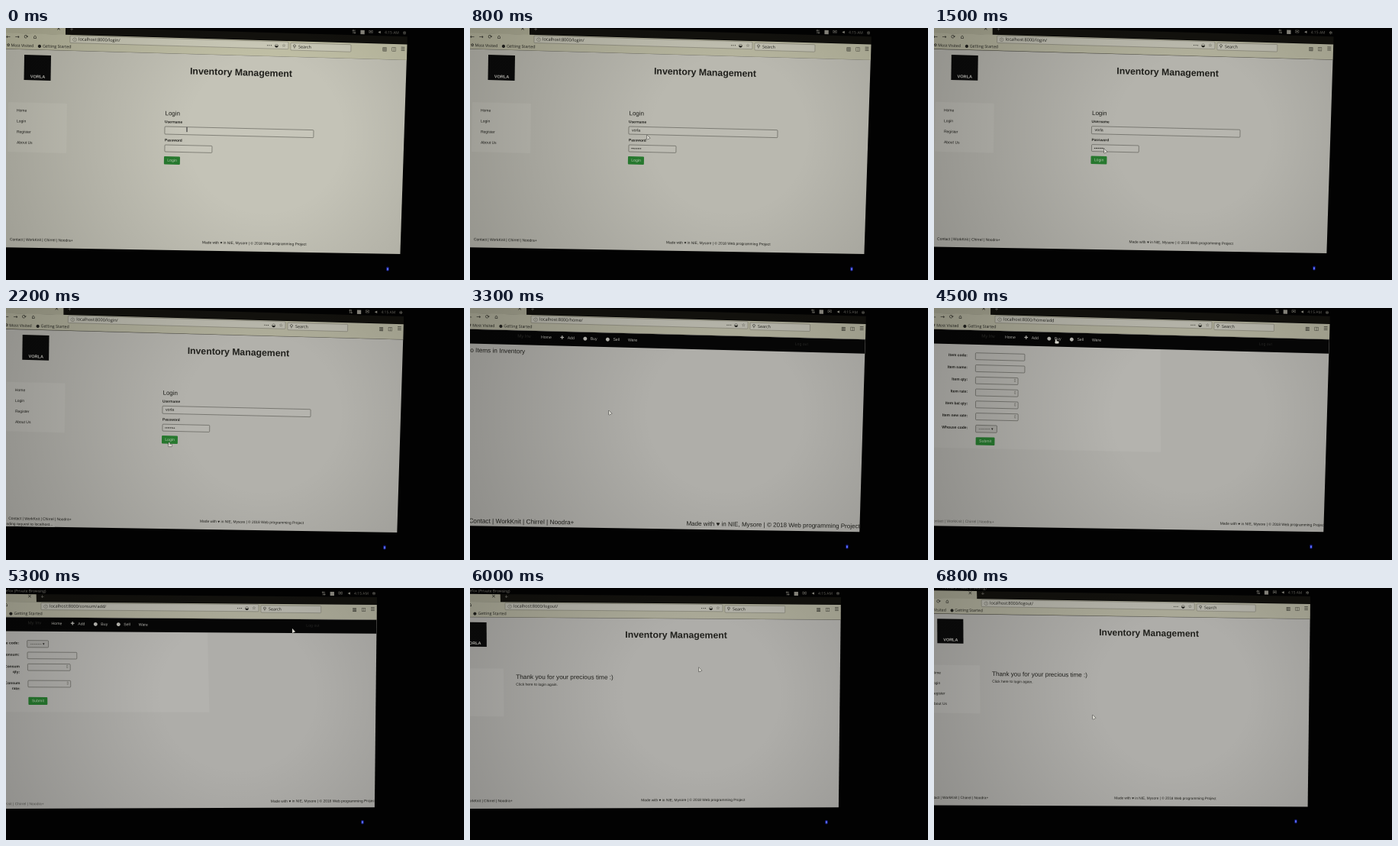
An HTML page with a canvas that plays this animation: 600x330 px, repeating every 6900 ms.

```html
<!DOCTYPE html>
<html lang="en">
<head>
<meta charset="utf-8">
<title>Inventory Management demo</title>
<style>
html, body { margin: 0; width: 100%; height: 100%; overflow: hidden; background: #020202; }
canvas { display: block; width: 600px; height: 330px; filter: blur(.25px); }
</style>
</head>
<body>
<canvas id="stage" width="600" height="330"></canvas>
<script>
const ctx = document.getElementById('stage').getContext('2d');
const LOOP = 6900, STEP = 100;
const SANS = '"Liberation Sans", Arial, sans-serif';
const UI = '"Open Sans", "Noto Sans", sans-serif';
const GLYPH = '"DejaVu Sans", sans-serif';
const INK = '#20201c', DIM = '#8a887f', GREEN = '#277a2f', RIM = 'rgba(60,60,54,.7)';

const clamp = p => Math.min(1, Math.max(0, p));
const ramp = (t, from, to) => clamp((t - from) / (to - from));
const smooth = p => p * p * (3 - 2 * p);

// Resting spots of the address, the search label and the monitor's LED.
const ANCHORS = [[95, 15], [383, 25], [500, 316]];

// Hand-held camera: when it moves, and how far each anchor travels.
const MOVES = [
  { from: 800, to: 2900, shift: [[-4, 0], [-6, -.5], [-6, -3]] },
  { from: 5000, to: 5300, shift: [[-34, 9], [-33, 3.5], [-27, -6]] },
  { from: 6300, to: 6700, shift: [[16, -4], [10, -2], [7, -1]] }
];

const POINTER = [
  [0, 237, 133], [800, 233, 142], [2200, 215, 178], [3300, 183, 136],
  [4500, 161, 43], [5300, 376, 55], [6800, 209, 168]
];

const PAGES = [
  { from: 0, path: 'login/', draw: login },
  { from: 2600, path: 'home/', draw: home },
  { from: 3800, path: 'home/add', draw: addItem },
  { from: 4900, path: 'consum/add/', draw: consume },
  { from: 5800, path: 'logout/', draw: logout }
];

// Affine map that carries the resting anchors to their places at time t.
function aim(t) {
  const spots = ANCHORS.map((spot, i) => spot.map((v, axis) =>
    MOVES.reduce((sum, m) => sum + m.shift[i][axis] * ramp(t, m.from, m.to), v)));
  const sides = ([a, b, c]) => [b[0] - a[0], b[1] - a[1], c[0] - a[0], c[1] - a[1]];
  const [ux, uy, vx, vy] = sides(ANCHORS), [px, py, qx, qy] = sides(spots);
  const det = ux * vy - uy * vx;
  const a = (vy * px - uy * qx) / det, c = (ux * qx - vx * px) / det;
  const b = (vy * py - uy * qy) / det, d = (ux * qy - vx * py) / det;
  const [[x0, y0]] = ANCHORS, [[x1, y1]] = spots;
  ctx.setTransform(a, b, c, d, x1 - a * x0 - c * y0, y1 - b * x0 - d * y0);
}

const slope = y => .029 - .00004 * y;
const edge = y => 525.5 - (y - 21) * .033;

// The exposure settles and the warm cast fades.
let light = 0, warm = 0;
function expose(t) {
  light = Math.round(174 + 22 * Math.exp(-t / 1200));
  warm = Math.round(5 + 8 * Math.exp(-t / 1800));
}
const tone = (lift = 0, tint = 0) => {
  const v = light + lift;
  return `rgb(${v},${v - 1},${v - warm - tint})`;
};

function local(x, y, draw) {
  ctx.save();
  ctx.transform(1, slope(y), -.015, 1, x, y);
  draw();
  ctx.restore();
}

function text(str, x, y, size, { color = INK, bold = false, font = SANS, align = 'left' } = {}) {
  local(x, y, () => {
    ctx.font = `${bold ? 'bold ' : ''}${size}px ${font}`;
    ctx.textAlign = align;
    ctx.textBaseline = 'middle';
    ctx.fillStyle = color;
    ctx.fillText(str, 0, 0);
  });
}

const icon = (glyph, x, y, size, color = INK) =>
  text(glyph, x, y, size, { color, font: GLYPH, align: 'center' });

function box(x, y, w, h, fill, stroke, r = 1) {
  local(x, y, () => {
    ctx.beginPath();
    ctx.roundRect(0, 0, w, h, r);
    if (fill) { ctx.fillStyle = fill; ctx.fill(); }
    if (stroke) { ctx.strokeStyle = stroke; ctx.lineWidth = .7; ctx.stroke(); }
  });
}

// Full strip between two heights, both measured at the left edge.
function band(y0, y1, fill, right) {
  const at = (x, y) => ctx.lineTo(x, y + x * slope(y));
  ctx.beginPath();
  at(-40, y0);
  at(right || edge(y0 + 14), y0);
  at(right || edge(y1 + 10), y1);
  at(-40, y1);
  ctx.fillStyle = fill;
  ctx.fill();
}

function systemBar() {
  ['⇅', '■', '✉', '◂'].forEach((g, i) => icon(g, 456 + i * 11, 5.5, 7, DIM));
  text('4:15 AM', 496, 6, 5, { color: '#6f6d66', font: UI });
  icon('✲', 522, 7, 6, DIM);
  box(519, 16, 4.5, 2.4, DIM);
}

function chrome(path) {
  text('Firefox (Private Browsing)', 32, -7, 5, { color: DIM, font: UI });
  band(-4, 6, '#12110d');
  band(-4, 7, tone(-14, 14), 78);
  band(6.5, 27.5, tone(-4, 14));
  band(27, 27.6, 'rgba(70,68,58,.5)');
  icon('×', 69, 1, 7);
  icon('+', 86, 2, 6, DIM);
  ['←', '→', '⟳', '⌂'].forEach((g, i) => icon(g, 3 + i * 11.7, 12, 7));

  box(84, 10, 286, 9.5, tone(6, 6), 'rgba(80,78,68,.5)');
  icon('ⓘ', 90, 15, 5);
  text('localhost:8000/' + path, 95, 15, 5.6, { font: UI });
  ['•••', '◒', '☆'].forEach((g, i) => icon(g, 345 + i * 9.5, 23.2, 6 - !i * 2));
  box(373, 19.5, 79, 9.5, tone(6, 6), 'rgba(80,78,68,.5)');
  icon('⚲', 378, 24.5, 6);
  text('Search', 383, 25, 5.4, { font: UI });

  icon('✿', 3, 22.5, 5);
  text('Most Visited', 6.5, 23, 5.2, { font: UI });
  icon('●', 44, 24, 5.5);
  text('Getting Started', 48, 24, 5.3, { font: UI });
  ['▥', '◫', '☰'].forEach((g, i) => icon(g, 496 + i * 12, 28, 6.5));
}

function footer(size, leftX, rightX, y, color = INK) {
  text('Contact | WorkKnit | Chirrel | Noodra+', leftX, y, size, { color });
  text('Made with ♥ in NIE, Mysore | © 2018 Web programming Project', rightX, y + 4, size * .98);
}

function siteFrame() {
  box(24, 35, 35, 33, '#0b0b0b', null, 0);
  text('VORLA', 41.5, 64, 5.6, { color: '#c9c8c2', bold: true, align: 'center' });
  text('Inventory Management', 241, 57, 12.3, { bold: true });
  box(3, 97, 77, 65, tone(6));
  ['Home', 'Login', 'Register', 'About Us'].forEach((s, i) => text(s, 14, 108 + i * 14, 5));
  footer(4.95, 5, 257, 277);
}

function field(x, y, w, h = 9) {
  box(x, y, w, h, tone(3), RIM);
}

function button(label, x, y, w) {
  box(x, y, w, 10.5, GREEN);
  text(label, x + w / 2, y + 5.5, 5.2, { color: '#b5ccb0', align: 'center' });
}

function login(t) {
  siteFrame();
  text('Login', 208.5, 112, 8);
  text('Username', 208, 123, 4.8, { bold: true });
  field(208, 129, 195, 10);
  text('Password', 208, 147, 4.8, { bold: true });
  field(208, 153, 62);
  text('vorla'.slice(0, Math.floor(5 * ramp(t, 200, 600))), 212, 134, 5.2);
  text('•'.repeat(8 * ramp(t, 600, 800)), 211, 158, 4.8);
  button('Login', 207, 168, 21);
  if (t >= 2000) {
    box(-12, 280, 78, 8, tone(4));
    text('Sending request to localhost...', -4, 284, 5);
  }
}

function navBar() {
  band(27.5, 46.5, '#060606');
  text('My Inv', 66, 37, 6, { color: '#2e2e2b' });
  text('Log out', 432, 48, 5.2, { color: '#262624' });
  const color = '#b9b8b2', rise = x => 35.2 + x * .034;
  let x = 97;
  for (const item of ['Home', '✚ Add', '● Buy', '● Sell', 'Ware']) {
    const [label, glyph] = item.split(' ').reverse();
    if (glyph) {
      icon(glyph, x + 3, rise(x), 6.5, color);
      x += 10;
    }
    text(label, x, rise(x), 5.2, { color });
    ctx.font = `5.2px ${SANS}`;
    x += ctx.measureText(label).width + 11;
  }
}

function home() {
  navBar();
  text('No Items in Inventory', -2.5, 55.5, 8.3);
  footer(8.3, 1, 288, 281);
}

// Labelled rows, each a select, a wide text field or a number field, then the button.
function form(x, y, panel, rows) {
  band(46.5, panel, tone(5), 302);
  navBar();
  for (const [label, kind] of rows) {
    const lines = label.split('\n');
    lines.forEach((s, i) => text(s, x - 10.5, y + 3.5 + i * 7.4, 5, { bold: true, align: 'right' }));
    if (kind === 'select') {
      box(x, y, 28, 9.5, tone(-6), RIM);
      text('--------- ▾', x + 4, y + 5, 5);
    } else {
      field(x, y, kind === 'text' ? 65 : 56);
      if (kind === 'number') icon('⇕', x + 52, y + 5.5, 6, '#77766f');
    }
    y += 15.9 + 6.6 * (lines.length - 1);
  }
  button('Submit', x, y, 25);
  footer(5, -2, 380, 281, '#5c5c57');
}

function addItem() {
  form(58, 59, 184, [
    ['Item code:', 'text'], ['Item name:', 'text'], ['Item qty:', 'number'], ['Item rate:', 'number'],
    ['Item bal qty:', 'number'], ['Item new rate:', 'number'], ['Whouse code:', 'select']
  ]);
}

function consume() {
  form(64.5, 60.5, 156, [
    ['Whouse code:', 'select'], ['Consum:', 'text'], ['Consum\nqty:', 'number'], ['Consum\nrate:', 'number']
  ]);
}

function logout() {
  siteFrame();
  text('Thank you for your precious time :)', 96, 111, 8.3);
  text('Click here to login again.', 96, 121, 5);
}

function pointer(t) {
  const i = POINTER.findIndex((p, n) => n === POINTER.length - 1 || POINTER[n + 1][0] > t);
  const [t0, x0, y0] = POINTER[i], [t1, x1, y1] = POINTER[i + 1] || [LOOP, x0, y0];
  const p = smooth(ramp(t, t0, t1));
  ctx.setTransform(1, 0, 0, 1, x0 + (x1 - x0) * p, y0 + (y1 - y0) * p);
  ctx.lineWidth = .8;
  ctx.strokeStyle = '#282826';
  ctx.fillStyle = '#d4d3cb';
  ctx.beginPath();
  const overLink = (t >= 1900 && t < 2600) || (t >= 4300 && t < 4900);
  if (t < 400) {
    ctx.rect(-.2, -3, .4, 6);
  } else if (overLink) {
    ctx.roundRect(-2, -2, 1.6, 4, .8);
    ctx.roundRect(-2.5, .4, 5, 3.2, 1);
  } else {
    ctx.moveTo(-1, -2);
    ctx.lineTo(-1, 4);
    ctx.lineTo(3, 2.2);
    ctx.closePath();
  }
  ctx.stroke();
  ctx.fill();
}

function draw(t) {
  ctx.setTransform(1, 0, 0, 1, 0, 0);
  ctx.fillStyle = '#020202';
  ctx.fillRect(0, 0, 600, 330);

  expose(t);
  aim(t);
  const page = PAGES.filter(p => p.from <= t).pop();
  systemBar();
  chrome(page.path);

  ctx.save();
  ctx.beginPath();
  ctx.moveTo(-40, 26.5);
  ctx.lineTo(edge(42), 42);
  ctx.lineTo(edge(296), 296);
  ctx.lineTo(-40, 286.5);
  ctx.clip();
  ctx.fillStyle = tone();
  ctx.fillRect(-50, 20, 600, 300);
  page.draw(t);
  ctx.restore();

  const shade = ctx.createRadialGradient(340, 140, 100, 340, 140, 420);
  shade.addColorStop(0, 'rgba(0,0,0,0)');
  shade.addColorStop(1, 'rgba(0,0,0,.22)');
  ctx.fillStyle = shade;
  ctx.fillRect(-60, -40, 720, 400);

  box(498, 312.5, 4, 6, 'rgba(30,40,170,.6)', null, 2);
  box(499, 314, 2, 3.4, '#5a6cff', null, 1);
  pointer(t);
}

const start = performance.now();
function tick() {
  const t = (performance.now() - start) % LOOP;
  draw(Math.floor(t / STEP) * STEP);
  requestAnimationFrame(tick);
}
tick();
</script>
</body>
</html>
```
